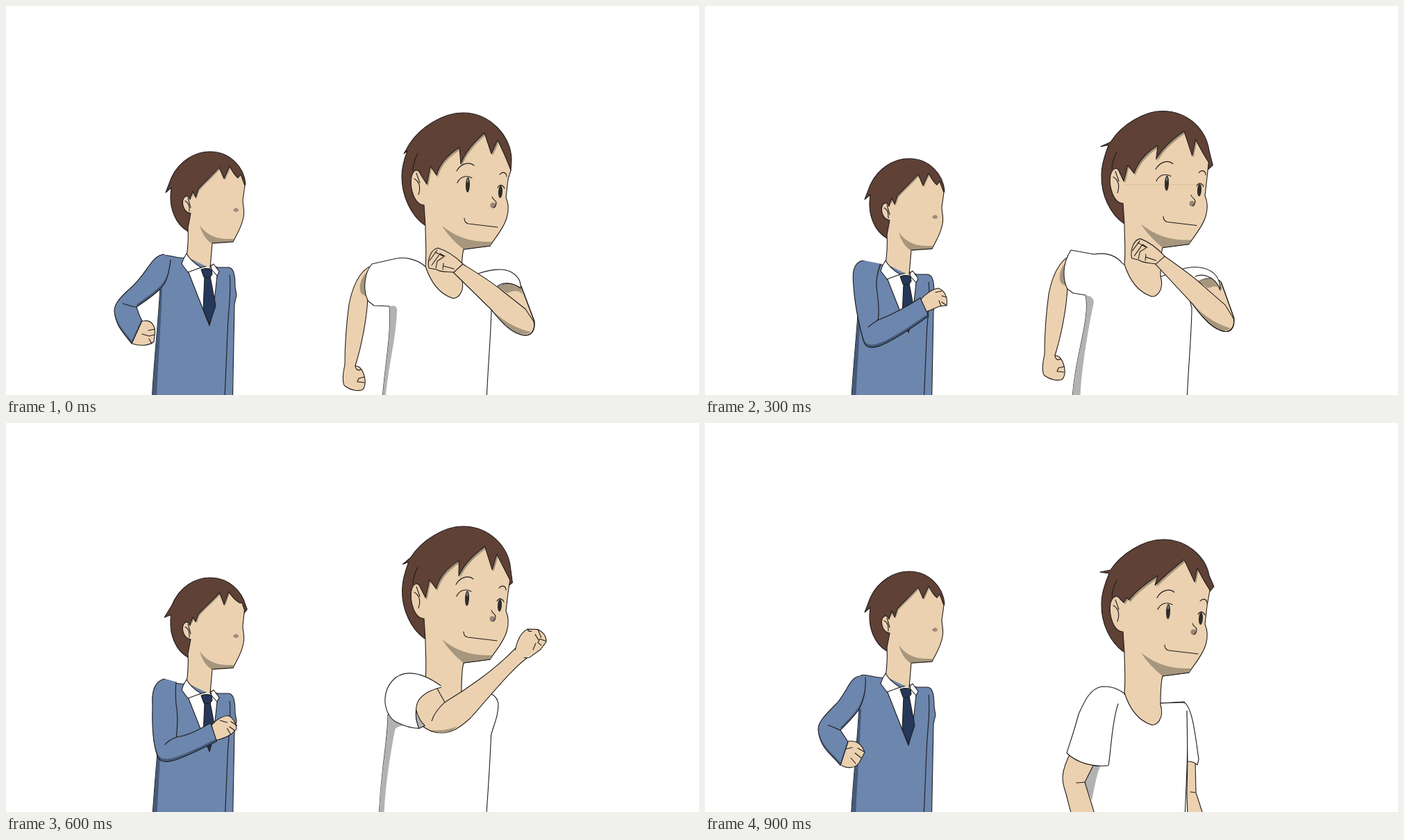
An HTML page with a canvas for the animation above (1000 ms loop, 998 by 561 pixels).

```html
<!DOCTYPE html>
<html lang="en">
<head>
<meta charset="utf-8">
<title>Two runners</title>
<style>
html, body { margin: 0; width: 100%; height: 100%; overflow: hidden; background: #fff; }
canvas { display: block; }
</style>
</head>
<body>
<canvas id="stage" width="998" height="561"></canvas>
<script>
const ctx = document.getElementById('stage').getContext('2d');
const INK = '#1f1c1c', SKIN = '#ebd1b0', SKIN_DARK = '#a6967d', HAIR = '#5f4136';
const BLUE = '#6c86ad', BLUE_DARK = '#465a79', NAVY = '#25385a', GRAY = '#b2b2b2';
const STEP = 100, STEPS = 10;

// Blend two paths that share the same commands
function mix(a, b, t) {
  if (!t) return a;
  const to = b.match(/-?[\d.]+/g);
  let i = 0;
  return a.replace(/-?[\d.]+/g, v => +v + (to[i++] - v) * t);
}
const blend = (keys, [a, b = a, t = 0]) => mix(keys[a], keys[b], t);

function draw(path, fill, line = true) {
  const p = new Path2D(path);
  if (fill) { ctx.fillStyle = fill; ctx.fill(p); }
  if (line) ctx.stroke(p);
}

function scope(fn) { ctx.save(); fn(); ctx.restore(); }
const moved = (x, y, fn) => scope(() => { ctx.translate(x, y); fn(); });

// Shift a limb by different amounts at its two ends
function bent(x0, x1, [ax, ay, bx, by], fn) {
  const k = (bx - ax) / (x1 - x0), m = (by - ay) / (x1 - x0);
  scope(() => { ctx.transform(1 + k, m, 0, 1, ax - k * x0, ay - m * x0); fn(); });
}

// Fill with a darker rim where the shifted light shape does not reach
function shaded(path, light, dark, dx, dy, box) {
  const p = new Path2D(path);
  draw(path, light, false);
  scope(() => {
    ctx.clip(p);
    if (box) { ctx.beginPath(); ctx.rect(...box); ctx.clip(); }
    ctx.fillStyle = dark; ctx.fill(p);
    ctx.translate(dx, dy);
    ctx.fillStyle = light; ctx.fill(p);
  });
  ctx.stroke(p);
}

function dot(x, y, rx, ry, fill, tilt = 0) {
  ctx.beginPath();
  ctx.ellipse(x, y, rx, ry, tilt, 0, 7);
  ctx.fillStyle = fill;
  ctx.fill();
}

// ---- Runner in blue ----
const blue = {
  dy: [0, 13, 22, 10, 4],
  wind: [0, .6, 1, 0, 0],
  arm: [[0], [0, 1, .5], [1], [2], [3], [4], [4, 1, .5], [1], [1, 5, .5], [5]],
  hair: [
    'M262,325 C244,315 236,292 237,272 L238,262 L230,269 L238,248 C250,222 274,210 294,210 C322,210 343,232 345,257 L343,260 L320,290 L275,300 Z',
    'M262,325 C244,315 236,292 237,272 L237,265 L227,266 L239,252 C250,222 274,210 294,210 C320,210 338,228 345,245 L350,253 L320,290 L275,300 Z'],
  face: [
    'M260,362 C262,348 263,335 262,320 L266,299 C256,298 252,284 256,277 C259,272 263,274 265,279 L269,267 L273,276 L277,264 C284,256 295,246 307,233 L314,249 L322,231 C326,239 330,245 334,248 L338,243 L344,259 L341,280 C341,288 344,294 342,304 C340,318 332,330 327,340 L297,342 L294,378',
    'M260,362 C262,348 263,335 262,320 L266,299 C256,298 252,284 256,277 C259,272 263,274 265,279 L269,267 L273,272 L277,262 C284,254 295,245 308,231 L314,249 L320,230 C326,238 333,243 339,246 L341,248 L343,255 L341,280 C341,288 344,294 342,304 C340,318 332,330 327,340 L297,342 L294,378'],
  sleeve: [
    'M228,358 C208,360 205,385 178,408 C160,424 156,432 156,440 C158,462 170,472 181,487 L196,454 C192,447 190,440 188,434 C200,426 214,416 222,408 C232,398 235,385 237,366',
    'M224,382 C208,388 206,408 205,420 C196,448 193,470 193,488 C194,512 212,508 276,501 L268,470 C255,470 245,472 231,473 C236,452 240,432 240,420 C240,405 236,392 232,384',
    'M228,367 C210,370 213,392 214,405 C216,435 224,470 229,485 C235,500 255,495 322,447 L310,421 C290,434 270,445 249,453 C252,440 249,420 247,405 C246,392 250,380 253,372',
    'M230,361 C211,366 214,385 214,400 C218,432 226,458 232,473 C240,487 258,485 326,429 L317,407 C295,425 275,435 257,440 C256,430 251,412 249,400 C248,385 252,375 255,367',
    'M233,356 C213,358 214,380 217,395 C224,430 230,450 241,466 C250,482 268,474 331,417 L321,395 C300,415 285,428 260,433 C258,420 255,405 250,392 C248,380 252,370 258,363',
    'M222,365 C208,368 206,385 190,404 C170,424 163,432 163,442 C165,470 185,480 195,494 L206,460 C202,453 198,448 195,443 C206,432 214,424 221,414 C228,402 232,385 231,367'],
  hand: [
    'M181,483 C176,470 186,454 199,454 C210,453 216,462 214,474 L213,484 C205,491 190,490 182,487',
    'M270,473 C280,466 290,463 296,462 C302,464 308,475 309,480 L303,490 C296,496 285,498 273,498',
    'M311,423 C318,415 328,408 336,407 C345,410 350,420 348,432 L338,433 C330,436 322,440 318,441',
    'M319,409 C328,399 336,396 345,397 C353,401 354,413 351,420 L340,421 C335,426 330,428 325,429',
    'M323,397 C328,388 335,382 344,382 C354,386 356,396 355,402 L348,406 C340,410 336,414 331,417',
    'M196,492 C190,475 196,460 206,459 C220,457 227,466 230,475 L222,490 C215,500 202,497 197,494'],
  fingers: [
    'M214,466 L205,468 M214,474 L206,476 M210,487 L206,480 M196,473 L206,476',
    'M309,478 L300,471 M306,486 L296,478 M300,492 L293,484 M284,470 L296,478',
    'M348,420 L341,418 M348,432 L341,427 M340,433 L337,425 M332,413 L341,411',
    'M353,410 L346,405 M351,419 L345,413 M341,421 L341,412 M333,402 L342,401',
    'M356,395 L348,390 M354,402 L348,398 M347,406 L344,397 M333,388 L341,386',
    'M229,474 L220,469 M225,483 L216,476 M217,491 L210,483 M203,470 L212,468'],
  crease: [
    'M188,434 C182,434 174,431 168,429',
    'M231,473 C222,474 213,476 207,481',
    'M249,453 C244,456 240,459 235,463',
    'M257,440 C250,442 246,445 242,450',
    'M260,433 C256,437 253,441 251,447',
    'M195,443 C189,441 183,437 177,436']
};

function drawBlue(step) {
  const beat = step % 5, wind = [0, 1, blue.wind[beat]], pose = blue.arm[step];
  moved(0, blue.dy[beat], () => {
    draw('M258,363 C245,365 235,357 224,360 L222,405 C220,450 212,520 209,590 L326,590 C327,530 328,470 329,430 L332,417 L330,405 C330,385 327,378 321,377 L305,377 Z', BLUE);
    draw('M222,408 C220,450 212,520 210,590 L216,590 C218,530 222,480 225,408 Z', BLUE_DARK, false);
    draw('M322,388 C325,410 320,440 319,470 L314,590');
    draw('M262,382 L293,461 C299,440 302,410 304,388 L294,374 Z', '#fff');
    draw(blend(blue.hair, wind), HAIR);
    shaded(blend(blue.face, wind), SKIN, SKIN_DARK, 1.5, 2, [268, 220, 60, 60]);
    draw('M279,316 C290,332 305,337 328,336 L326,341 L297,343 C288,337 283,330 279,316 Z', SKIN_DARK, false);
    draw('M327,340 L297,342 M258,281 C264,284 264,290 264,296 M262,277 L266,291');
    draw('M327,295 C329,290 334,290 335,295 C333,298 329,297 327,295 Z', '#a08a78', false);
    draw('M260,357 C256,363 254,368 253,372 L262,384 L281,377 C272,372 265,366 260,357 Z', '#fff');
    draw('M295,375 L299,372 L307,383 L304,389 L296,380 Z', '#fff');
    draw('M286,390 L294,390 L302,432 L293,459 L284,438 Z', NAVY);
    draw('M281,380 C286,378 292,378 296,380 L297,387 L293,392 L285,391 Z', NAVY);
  });
  draw(blend(blue.hand, pose), SKIN);
  draw(blend(blue.fingers, pose));
  shaded(blend(blue.sleeve, pose), BLUE, BLUE_DARK, 0, -4);
  draw(blend(blue.crease, pose));
}

// ---- Runner in white ----
const white = {
  dy: [0, -5, -7.5, -2.5, 14],
  look: [0, 0, 0, 0, 0, -1, -1, -1, 0, 2],
  head: [[0], [0, 1, .6], [1], [1, 2, .15], [2]],
  back: [[0], [0, 1, .6], [1], [2]],
  front: [[0], [0, 1, .6], [1], [1, 0, .35]],
  backShift: [[0, 0], [-3, -12], [-5, -22], [1, -15]],
  farShift: [[0, 0, 0, 0], [4, -12, -3, -5], [6, -20, -4, -8], [5, -13, 1, -5]],
  nearShift: [[0, 0, 0, 0], [0, -8, -2, -14], [0, -14, -3, -24], [0, -9, -2, -16]],
  hair: [
    'M603,316 C584,303 570,275 570,246 C570,232 573,222 578,209 L573,213 L581,199 C597,174 630,154 658,154 C697,154 728,188 728,222 L727,237 L700,260 L620,290 Z',
    'M603,316 C584,303 570,275 571,246 C571,234 574,222 581,203 L570,206 L584,199 C599,174 632,154 658,154 C697,154 722,182 726,212 L731,234 L700,260 L620,290 Z',
    'M603,316 C584,303 570,275 571,246 C571,234 574,222 582,203 L569,201 L584,198 C600,174 632,154 660,154 C697,154 722,182 726,206 L733,222 L700,260 L620,290 Z'],
  face: [
    'M604,375 C606,355 604,335 604,318 L602,287 C588,287 581,262 584,246 C587,235 594,234 597,243 L606,257 L611,231 L620,244 C624,228 634,216 653,204 L655,228 C660,212 672,198 689,183 L699,213 L708,193 C714,206 721,220 727,237 L723,250 L720,276 C724,285 724,296 721,306 C716,322 706,332 697,346 L659,351 C656,362 656,378 656,392 C662,412 650,424 642,421 C625,415 612,400 604,375',
    'M604,375 C606,355 604,335 604,318 L602,287 C588,287 581,262 584,246 C587,235 594,234 597,243 L603,257 L609,231 L619,244 C624,228 634,214 652,203 L650,224 C658,208 672,195 690,183 L701,219 L706,195 C712,206 718,218 725,228 L723,250 L720,276 C724,285 724,296 721,306 C716,322 706,332 697,346 L659,351 C656,362 656,378 656,392 C662,412 650,424 642,421 C625,415 612,400 604,375',
    'M604,375 C606,355 604,335 604,318 L602,287 C588,287 581,262 584,246 C587,235 594,234 597,239 L603,245 L607,238 L611,241 C620,228 640,214 652,206 L648,220 C660,208 674,196 690,183 L705,215 L709,195 C714,206 720,216 727,227 L723,250 L720,276 C724,285 724,296 721,306 C716,322 706,332 697,346 L659,351 C656,362 656,378 656,392 C662,412 650,424 642,421 C625,415 612,400 604,375'],
  // Near arm behind
  backTorso: [
    'M603,375 C590,364 572,361 558,365 L527,372 C516,385 513,410 522,426 L530,432 L552,433 C556,470 545,520 542,570 L692,570 C694,520 698,480 699,438 L690,400 L680,386 L657,392 Z',
    'M602,370 C592,360 585,356 575,356 L531,357 C512,370 514,395 525,411 L532,415 L551,418 C558,450 535,500 535,570 L696,570 C697,520 701,470 701,435 L688,395 L675,378 L657,385 Z',
    'M602,372 C592,360 580,355 560,358 L527,352 C514,372 515,395 522,408 L530,414 L548,417 C556,450 531,510 529,570 L694,570 C696,520 701,470 701,435 L690,395 L685,380 L657,390 Z'],
  backShade: [
    'M552,433 C562,430 564,436 563,440 C562,480 550,520 546,570 L542,570 C545,520 556,470 552,433 Z',
    'M551,418 C558,418 560,424 560,428 C553,460 546,520 546,570 L535,570 C535,500 558,450 551,418 Z',
    'M548,417 C556,418 560,422 560,427 C553,460 542,520 540,570 L529,570 C531,510 556,450 548,417 Z'],
  farSleeve: [
    'M680,386 C700,379 718,378 728,384 C738,390 742,398 741,407 C730,398 715,398 708,404',
    'M658,370 C680,385 700,370 718,373 C732,380 738,386 739,393 C726,386 715,388 706,394',
    'M685,380 C697,376 710,376 718,378 C732,382 742,390 742,410 C735,388 715,386 706,390'],
  // Near arm in front
  frontTorso: [
    'M603,376 L575,400 L553,430 C553,470 544,520 541,570 L692,570 C695,530 697,500 698,465 C702,445 709,430 709,412 C708,404 705,400 700,396 L657,392 Z',
    'M604,368 L575,395 L548,415 C548,450 535,500 535,570 L691,570 C694,530 697,480 699,440 C704,425 709,418 709,400 C708,394 706,391 700,388 L657,384 Z'],
  frontShade: [
    'M553,430 C560,444 575,448 585,449 C575,452 567,450 566,455 C560,490 550,530 546,570 L541,570 C544,520 553,470 553,430 Z',
    'M548,415 C560,423 565,424 572,426 C560,428 558,430 556,435 C549,470 543,520 543,570 L535,570 C535,500 548,450 548,415 Z'],
  nearSleeve: [
    'M620,392 C600,368 585,362 570,364 C552,368 546,385 547,402 C549,420 557,438 565,445 C572,451 580,451 587,450 C582,440 576,425 580,418 C590,405 600,398 621,392',
    'M630,370 C605,358 588,357 575,360 C555,366 545,385 545,402 C546,415 552,420 560,422 C575,428 588,433 600,434 C594,418 597,395 605,386 C612,378 622,376 630,374'],
  cuff: [
    'M580,418 C577,430 583,442 587,450 L599,446 C590,438 585,430 580,418 Z',
    'M598,412 C597,420 598,428 600,434 L606,430 C601,425 599,420 598,412 Z'],
  // Arms hanging
  hangSleeve: [
    'M603,391 C590,382 580,378 572,378 C556,376 548,390 540,400 C530,420 517,440 510,461 C520,476 540,488 558,491 C575,475 585,440 583,405',
    'M604,390 C590,380 580,380 572,380 C553,383 545,405 538,420 C530,450 524,465 521,476 C535,490 560,497 581,494 C585,470 586,430 595,405'],
  hangArm: [
    'M525,470 C512,500 509,515 512,525 L523,570 L555,570 L546,518 L560,485',
    'M526,476 C512,505 513,515 520,535 L529,570 L563,570 L547,518 L562,488'],
  hangFar: [
    'M657,404 L690,402 C702,408 710,450 722,484 L719,488 C712,491 702,488 695,489 L694,412',
    'M657,404 L690,403 C702,410 706,450 711,485 L709,493 C706,490 702,488 695,488 L694,415']
};

function drawHead(step) {
  const beat = step % 5, key = white.head[beat];
  moved(0, white.dy[beat], () => {
    draw(blend(white.hair, key), HAIR);
    shaded(blend(white.face, key), SKIN, SKIN_DARK, 2, 3, [604, 160, 118, 100]);
    draw('M628,317 C648,334 672,341 700,340 L697,346 L659,351 C645,340 635,328 628,317 Z', SKIN_DARK, false);
    draw('M697,346 L659,351 M588,249 C596,254 597,263 594,272 M591,241 L596,255 M593,213 C588,222 586,230 586,238');
    moved(white.look[step], 0, () => {
      dot(665, 258, 3, 11, '#2e2d2b', .03);
      dot(712, 268, 3, 9, '#2e2d2b', .06);
      dot(665, 252, 1, 3, '#8d8a84');
      dot(701.5, 287.5, 4, 4, '#9a8474');
      draw('M650,255 C654,245 664,244 671,248 M708,262 C711,257 715,257 718,263');
      draw('M649,238 C655,227 667,224 674,230 M711,243 C715,238 721,240 721,246');
      draw('M700,275 C701,280 706,280 706,284 C706,288 704,290 702,291');
      draw('M660,306 C660,311 662,313 666,314 L708,319');
    });
  });
}

function runBack(i, head) {
  const key = white.back[i];
  moved(...white.backShift[i], () => {
    draw('M535,372 C508,376 498,410 494,430 C490,460 488,490 488,517 C484,535 485,546 488,548 C498,555 508,556 514,553 C519,546 518,538 514,528 C511,521 507,519 503,519 C512,490 520,450 521,420 L535,410', SKIN);
    draw('M523,380 C512,390 506,405 512,415 L521,420 Z', SKIN_DARK, false);
    draw('M503,519 C504,526 508,526 511,524 M516,535 L508,537 L506,542 L516,543');
  });
  draw(blend(white.backTorso, key), '#fff');
  draw(blend(white.backShade, key), GRAY, false);
  head();
  bent(628, 757, white.farShift[i], () => {
    draw('M707,406 C720,398 735,398 742,404 L761,455 L745,468 Z', SKIN);
    draw('M708,405 C718,399 734,399 741,405 L744,416 C736,406 724,414 722,414 Z', SKIN_DARK, false);
  });
  draw(blend(white.farSleeve, key), '#fff');
  bent(628, 757, white.farShift[i], () => {
    draw('M642,382 L699,438 C715,458 730,474 748,475 C759,475 762,463 760,455 L748,437 L715,411 C700,398 680,386 656,371', SKIN);
    draw('M702,441 C715,452 730,464 756,470 C745,479 725,470 702,441 Z', SKIN_DARK, false);
    draw('M742,405 L761,455 C762,465 759,475 748,475 C730,474 715,458 699,438');
    draw('M609,378 C606,365 613,350 622,349 C635,353 648,362 658,372 L645,384 C635,383 625,384 620,380 Z', SKIN);
    draw('M610,367 L621,352 M613,374 L625,357 L632,361 M619,378 L621,368 L630,362 M629,380 L630,371 M630,375 L645,379 M618,355 L630,361');
  });
}

function runFront(i, head) {
  const key = white.front[i];
  draw(blend(white.frontTorso, key), '#fff');
  draw(blend(white.frontShade, key), GRAY, false);
  head();
  bent(625, 760, white.nearShift[i], () => {
    draw('M582,416 C585,435 605,454 627,455 C642,456 655,448 670,435 C700,403 735,362 756,350 L735,338 C705,368 660,396 632,411 L621,391 L604,388 Z', SKIN);
    draw('M610,450 C622,452 636,452 650,446 C638,458 624,457 610,450 Z', SKIN_DARK, false);
    draw('M632,411 C624,418 616,427 613,437');
    draw('M735,340 C738,326 744,315 753,311 L768,312 C778,317 781,325 780,331 L772,341 L756,352 L748,352', SKIN);
    draw('M753,311 C754,314 756,315 759,314 M768,312 L773,324 M779,329 L771,326 L768,331 L773,335 M764,319 L769,327 M761,341 L765,332');
  });
  draw(blend(white.nearSleeve, key), '#fff');
  draw(blend(white.cuff, key), GRAY);
}

function runHang(i, head) {
  draw(i ? 'M695,485 L694,532 L695,570 L719,570 L707,533 L706,488' : 'M695,485 L692,532 L691,570 L719,570 L708,533 L706,488', SKIN);
  draw('M699,532 L706,533');
  draw('M603,391 L583,405 L556,492 L546,518 L555,570 L691,570 C693,520 697,460 694,412 L690,402 L657,404 Z', '#fff');
  draw('M557,492 L575,482 C565,500 562,520 557,545 L546,518 Z', GRAY, false);
  draw(white.hangFar[i], '#fff');
  draw(white.hangArm[i], SKIN);
  draw('M535,519 L547,518');
  draw(white.hangSleeve[i], '#fff');
  head();
}

function drawWhite(step) {
  const beat = step % 5, head = () => drawHead(step);
  if (beat === 4) runHang(step > 4 ? 1 : 0, head);
  else (step < 5 ? runBack : runFront)(beat, head);
}

function tick(now) {
  const step = Math.floor(now / STEP) % STEPS;
  ctx.fillStyle = '#fff';
  ctx.fillRect(0, 0, 998, 561);
  ctx.strokeStyle = INK;
  ctx.lineWidth = 1.1;
  ctx.lineJoin = ctx.lineCap = 'round';
  drawBlue(step);
  drawWhite(step);
  requestAnimationFrame(() => tick(performance.now()));
}
tick(performance.now());
</script>
</body>
</html>
```
